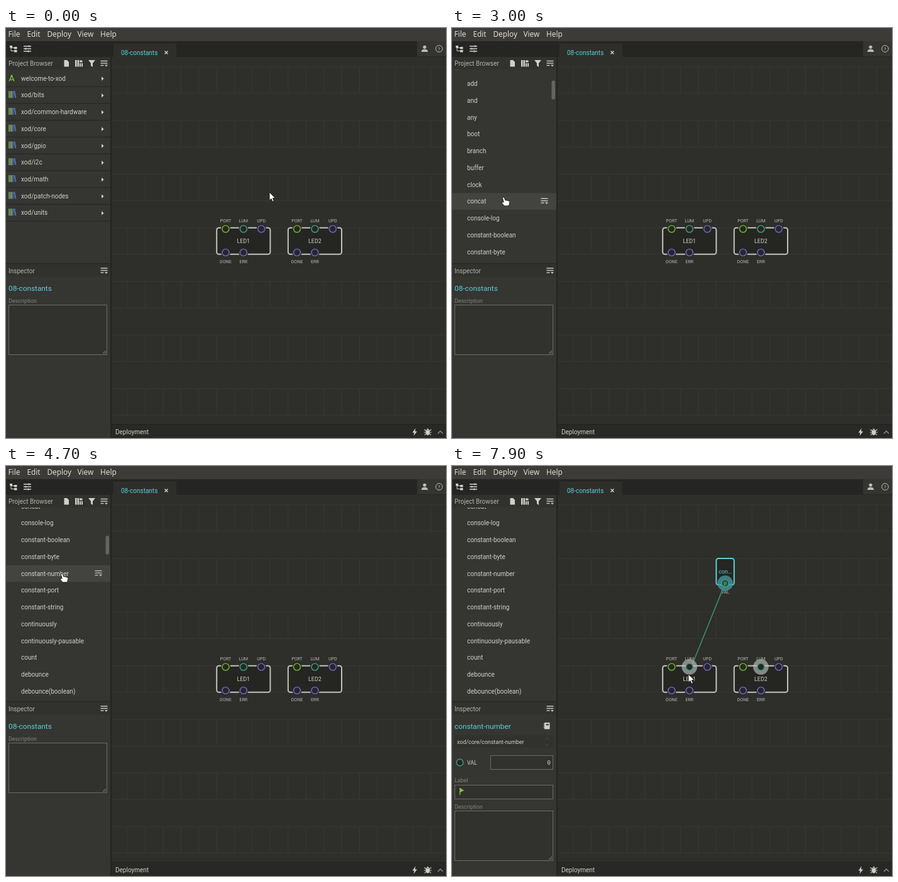
An HTML page that plays this animation: 700x652 px, repeating every 8 s.

```html
<!DOCTYPE html>
<html lang="en">
<head>
<meta charset="utf-8">
<title>Placing a constant node</title>
<style>
html, body { margin: 0; width: 100%; height: 100%; overflow: hidden; background: #2e2e2b; }
svg { display: block; width: 700px; height: 652px; font-family: Roboto, sans-serif; }
</style>
</head>
<body>
<svg id="stage" viewBox="0 0 700 652"></svg>
<script>
const LOOP = 8000, STEP = 100;
const SLOT_W = 28.4, SLOT_H = 42, BAND = 85.3, GRID_X = 193.2, GRID_Y = 61.8;
const ROW = 26.74, FIRST_ROW = 80;
const CYAN = '#5bd0d6', LIGHT = '#d0d0cb', DIM = '#a9a9a3', GREEN = '#6aa728', TEAL = '#38957a', VIOLET = '#675fbd';

const libraries = ['welcome-to-xod', ...['bits', 'common-hardware', 'core', 'gpio', 'i2c', 'math', 'patch-nodes', 'units'].map(n => 'xod/' + n)];
const corePatches = ['add', 'and', 'any', 'boot', 'branch', 'buffer', 'clock', 'concat', 'console-log',
  'constant-boolean', 'constant-byte', 'constant-number', 'constant-port', 'constant-string',
  'continuously', 'continuously-pausable', 'count', 'debounce', 'debounce(boolean)'];

// Keyframes: [time, ...values], linear in between
const pointerPath = [[0, 419, 261], [500, 419, 261], [900, 355, 184], [1000, 355, 184], [1400, 165, 82],
  [1500, 145, 90], [1700, 152, 158], [2200, 152, 158], [2600, 101, 250], [3000, 83, 269], [3600, 83, 269],
  [4300, 86, 188], [4400, 86, 188], [4700, 90, 171], [5100, 90, 171], [5400, 290, 165], [5600, 405, 211],
  [5700, 423, 202], [5800, 423, 202], [5900, 423, 162], [6100, 423, 162], [6200, 439, 171], [6300, 439, 171],
  [6600, 451, 249], [6700, 451, 249], [6800, 451, 240], [6900, 451, 240], [7200, 434, 187], [7400, 434, 187], [7900, 376, 331]];
const scrollPath = [[2600, 0], [3500, 221.4], [3600, 221.4], [4300, 310]];

function at(keys, t) {
  const next = keys.findIndex(k => k[0] > t);
  if (next === 0) return keys[0].slice(1);
  if (next < 0) return keys[keys.length - 1].slice(1);
  const a = keys[next - 1], b = keys[next], f = (t - a[0]) / (b[0] - a[0]);
  return a.slice(1).map((v, i) => v + (b[i + 1] - v) * f);
}

const rect = (x, y, w, h, fill, extra = '') => `<rect x="${x}" y="${y}" width="${w}" height="${h}" fill="${fill}" ${extra}/>`;
const circle = (x, y, r, fill, extra = '') => `<circle cx="${x}" cy="${y}" r="${r}" fill="${fill}" ${extra}/>`;
const path = (d, fill, extra = '') => `<path d="${d}" fill="${fill}" ${extra}/>`;
const stroke = (d, color, width = 1) => path(d, 'none', `stroke="${color}" stroke-width="${width}"`);
const move = (x, y, body) => `<g transform="translate(${x} ${y})">${body}</g>`;
const text = (x, cy, s, size = 10, fill = LIGHT, extra = '') =>
  `<text x="${x}" y="${cy + size * 0.355}" font-size="${size}" fill="${fill}" ${extra}>${s}</text>`;
const centered = (x, cy, s, size, fill) => text(x, cy, s, size, fill, 'text-anchor="middle"');

const menuIcon = (x, y) => move(x, y, stroke('M-5.5-4h11M-5.5-.5h11M-5.5 3h5', '#c4c4be', 1.4) + path('M1 2h5l-2.5 3z', '#c4c4be'));
const bookIcon = y => move(4, y, rect(0, -5.5, 2.6, 11, '#5c9070') + rect(3.4, -5.5, 1.6, 11, '#a8ad56') +
  rect(5.6, -5.5, 2, 11, '#3d928f') + path('M8-5.2l2.4-.5 2 10.6-2.4.5z', VIOLET));
const compassIcon = y => move(9, y, stroke('M0-4L-4 4.5M0-4L4 4.5M-3 1.5Q0 3.5 3 1.5', '#80c435', 1.5) + circle(0, -4, 1.6, '#80c435'));

function pin(x, y, color, ring, active) {
  return (ring ? circle(x, y, 12.3, ring) : circle(x, y, 7.5, '#252522')) +
    circle(x, y, 5.5, '#272724', `stroke="${color}" stroke-width="1.7"`) + (active ? circle(x, y, 3.3, '#2f7863') : '');
}

function node(x, y, slots, label, pins, border = '#c2c2bc', fill = '#252522') {
  const placed = pins.map(p => ({ ...p, px: x + (p.slot + 0.5) * SLOT_W, py: y + (p.out ? 39.3 : 1.8) }));
  return rect(x, y, slots * SLOT_W, SLOT_H, fill, `rx="3.5" stroke="${border}" stroke-width="2"`) +
    placed.map(p => centered(p.px, y + (p.out ? 53.5 : -11), p.name, 7.1, '#b8b8b2')).join('') +
    centered(x + slots * SLOT_W / 2, y + 21.2, label, 8.9, border === CYAN ? CYAN : LIGHT) +
    placed.map(p => pin(p.px, p.py, p.color, p.ring, p.active)).join('');
}

const ledNode = (x, label, ring) => node(x, 317.7, 3, label, [
  { slot: 0, name: 'PORT', color: GREEN }, { slot: 1, name: 'LUM', color: TEAL, ring }, { slot: 2, name: 'UPD', color: VIOLET },
  { slot: 0, name: 'DONE', color: VIOLET, out: true }, { slot: 1, name: 'ERR', color: VIOLET, out: true }]);

const constantNode = (x, y, border, fill, ring, active) =>
  node(x, y, 1, 'con…', [{ slot: 0, name: 'VAL', color: TEAL, out: true, ring, active }], border, fill);

function grid() {
  let d = '';
  for (let y = GRID_Y; y < 620; y += BAND) {
    d += `M168 ${y}H700M168 ${y + SLOT_H}H700`;
    for (let x = GRID_X; x < 700; x += SLOT_W) d += `M${x} ${y}v${SLOT_H}`;
  }
  return rect(168, 46, 532, 585, '#2e2e2b') + stroke(d, '#383835');
}

const chrome = rect(0, 0, 700, 21, '#3c3b37') +
  [['File', 3.5], ['Edit', 33.5], ['Deploy', 65.5], ['View', 113.5], ['Help', 150]].map(([s, x]) =>
    text(x, 10, s, 11.8, '#dfdbd2', 'font-family="Noto Sans, sans-serif"')).join('') +
  rect(0, 21, 700, 25, '#252523') + rect(171, 25, 100, 21, '#2e2e2b') + rect(654, 21, 46, 24, '#343431') +
  text(183, 39, '08-constants', 10, CYAN) + stroke('M252.5 36.5l5 5m0-5l-5 5', LIGHT, 1.4) +
  move(12, 33, stroke('M-4-3v6.5h6M-4-1.5h6', LIGHT) + rect(-6, -5, 4, 3.5, LIGHT) + rect(1, -3, 4.5, 3.5, LIGHT) + rect(1, 2, 4.5, 3.5, LIGHT)) +
  move(34, 33, stroke('M-6-4H6M-6 0H6M-6 4H6M2.5-5.5v3M-2.5-1.5v3M1.5 2.5v3', LIGHT, 1.4)) +
  circle(666, 30.3, 2.6, '#bcbcb6') + path('M660.8 38q0-4.3 5.2-4.3t5.2 4.3z', '#bcbcb6') +
  circle(689, 33, 5.3, 'none', 'stroke="#bcbcb6"') + centered(689, 33, '?', 8, '#bcbcb6');

const footer = rect(168, 630, 532, 22, '#282826') + rect(168, 630, 532, 1, '#20201e') + text(174, 642.5, 'Deployment') +
  path('M651.5 636.5l-5 7h3l-1 5 5.5-7h-3.2z', LIGHT) +
  move(671, 642, path('M-3-2.5h6v4q0 4-3 4t-3-4zM-2-3q2-4 4 0z', LIGHT) + stroke('M-5.5-3.5L-3-1.5M5.5-3.5L3-1.5M-6 1H6M-5 5.5L-3 3M5 5.5L3 3', LIGHT, 1.2)) +
  stroke('M687 645l4-4 4 4', '#858580', 1.6);

const browserHeader = rect(0, 46, 166, 20, '#31312e') + text(4, 56.5, 'Project Browser', 10, '#b4b4ae') +
  path('M92.5 51h4.5l3 3v7.5h-7.5z', LIGHT) +
  path('M110 51h2.5v10.5H110zM113.5 51h2.5v10.5h-2.5zM117 56h2v5.5h-2zM117 51.5h4.5v3H117zM120 56h2v5.5h-2z', LIGHT) +
  path('M131 51h11l-4 5v6l-3-2v-4z', LIGHT) + menuIcon(156, 56.5);

function browser(t, scroll, hovered) {
  const open = t >= 1900;
  const rows = libraries.map(name => ({ name, library: true }));
  if (open) rows.splice(4, 0, ...corePatches.map(name => ({ name })));
  const body = rows.map((row, i) => {
    const y = FIRST_ROW + i * ROW - scroll;
    if (y < 50 || y > 390) return '';
    let out = i === hovered ? rect(0, y - ROW / 2, 166, ROW, '#434340') : '';
    out += text(24, y, row.name);
    if (row.library) {
      const expanded = open && i === 3;
      out += (i ? bookIcon(y - 1) : compassIcon(y)) +
        path(expanded ? `M150.5 ${y - 1}h6.5l-3.2 3.5z` : `M152 ${y - 2.7}l3.6 3.2-3.6 3.2z`, LIGHT);
      if (!expanded) out += rect(0, y + ROW / 2 - 0.7, 166, 1.2, '#272725');
    } else if (i === hovered) out += menuIcon(147, y - 0.5);
    return out;
  }).join('');
  const thumb = t >= 2300 && t < 6400 ? rect(158.5, 71 + scroll * 0.128, 5.5, 30, '#646461', 'rx="2.7"') : '';
  return `<clipPath id="list"><rect y="66" width="166" height="308"/></clipPath><g clip-path="url(#list)">${body}${thumb}</g>`;
}

const field = (x, y, w, h) => rect(x + 0.5, y + 0.5, w, h, '#31312e', 'stroke="#6b6b67"');
const area = y => field(4, y, 156, 79) + stroke(`M154 ${y + 78}l5-5M157 ${y + 78}l2-2`, '#92928d');

function inspector(selected) {
  const head = rect(0, 374, 166, 1.5, '#262624') + rect(0, 375.5, 166, 20, '#31312e') +
    text(4, 386, 'Inspector', 10, '#b4b4ae') + menuIcon(156, 386);
  if (!selected) return head + text(4, 413.5, '08-constants', 11.8, CYAN) + text(4, 433.5, 'Description', 8.9, '#82827d') + area(440);
  return head + text(4, 413.5, 'constant-number', 11.8, CYAN) +
    rect(147, 408, 8.5, 10.5, LIGHT, 'rx="1"') + stroke('M145.5 410h3M145.5 413h3M145.5 416h3', LIGHT) + rect(149.5, 410, 4.5, 2.5, '#50504c') +
    rect(4.5, 428.5, 156, 19, '#31312e') + text(8, 438.5, 'xod/core/constant-number', 8.9) + stroke('M148 435l3-3 3 3M148 442l3 3 3-3', '#484844') +
    circle(12.5, 471.5, 5.3, '#272724', `stroke="${TEAL}" stroke-width="1.7"`) + text(24, 472, 'VAL', 8.9) +
    field(61, 460, 99, 22) + text(157, 472, '0', 9.5, LIGHT, 'text-anchor="end" font-family="DejaVu Sans Mono, monospace"') +
    text(4, 500, 'Label', 8.9, '#82827d') + field(4, 507, 156, 22) + path('M12 512h1.2l6 4-6 3v4H12z', '#80c435') +
    text(4, 542, 'Description', 8.9, '#82827d') + area(548);
}

const pointers = {
  arrow: 'M0 0v13.2l3-2.7 2.1 4.8 2.3-1-2.1-4.6h4.2z',
  hand: 'M-2.6 1.2Q-1.2-1.3.2 1L2 5.2q1.5-1 2.5.2 1.5-.7 2.2.5 2-.2 2.2 1.6l-.6 3.6-1 2.8H.2l-4-4.7q0-2 2-1.4l1 .5z',
  grab: 'M-4.5-3.2q1-2 2.5-.7 1.3-1.7 3 0 1.7-1 2.6.4 2-.3 2.3 1.7v2q-.4 2-1.6 2.8v2h-6.5v-2q-2.8-1.5-3-3.5 0-1.5.7-2.7z'
};

function pointer(t, x, y) {
  const kind = t >= 5000 && t < 6000 ? 'grab' : x < 166 && y > 66 && y < 374 ? 'hand' : 'arrow';
  return move(x, y, path(pointers[kind], '#fff', 'stroke="#111" stroke-width=".9" stroke-linejoin="round"'));
}

function dragged(x, y) {
  if (x < 168) return '';
  const column = Math.round((x - GRID_X) / SLOT_W), row = Math.round((y - GRID_Y) / BAND);
  return rect(GRID_X + column * SLOT_W, GRID_Y + row * BAND, SLOT_W, SLOT_H, '#41868b', 'rx="3"') +
    constantNode(x, y, '#c2c2bc', '#1d1d1b');
}

function hoveredRow(t, x, y, scroll) {
  if (t >= 5000) return t < 6400 ? 15 : -1;
  return x < 166 && y > 66 && y < 374 ? Math.round((y - FIRST_ROW + scroll) / ROW) : -1;
}

function scene(t) {
  const [x, y] = at(pointerPath, t), [scroll] = at(scrollPath, t);
  const selected = t >= 6400, linking = t >= 7500, homeX = GRID_X + 8 * SLOT_W, homeY = GRID_Y + BAND;
  const lumRing = linking ? 'rgba(190,190,184,.65)' : '';
  return grid() +
    (t >= 6000 ? constantNode(homeX, homeY, selected ? CYAN : '#c2c2bc', '#252522', linking && 'rgba(70,150,156,.8)', t >= 7200) : '') +
    (linking ? stroke(`M${homeX + SLOT_W / 2} ${homeY + 39.3}L${x} ${y}`, '#37966f', 1.5) : '') +
    ledNode(GRID_X + 5 * SLOT_W, 'LED1', lumRing) + ledNode(GRID_X + 9 * SLOT_W, 'LED2', lumRing) +
    rect(0, 46, 166, 606, '#353532') + browser(t, scroll, hoveredRow(t, x, y, scroll)) + browserHeader + inspector(selected) +
    rect(166, 21, 2, 631, '#232321') + chrome + footer +
    (t >= 5200 && t < 6000 ? dragged(x + 1, y - 2) : '') + pointer(t, x, y);
}

const stage = document.getElementById('stage');
let shown = -1;
function tick() {
  const t = Math.floor(performance.now() % LOOP / STEP) * STEP;
  if (t !== shown) stage.innerHTML = scene(shown = t);
  requestAnimationFrame(tick);
}
tick();
</script>
</body>
</html>
```
